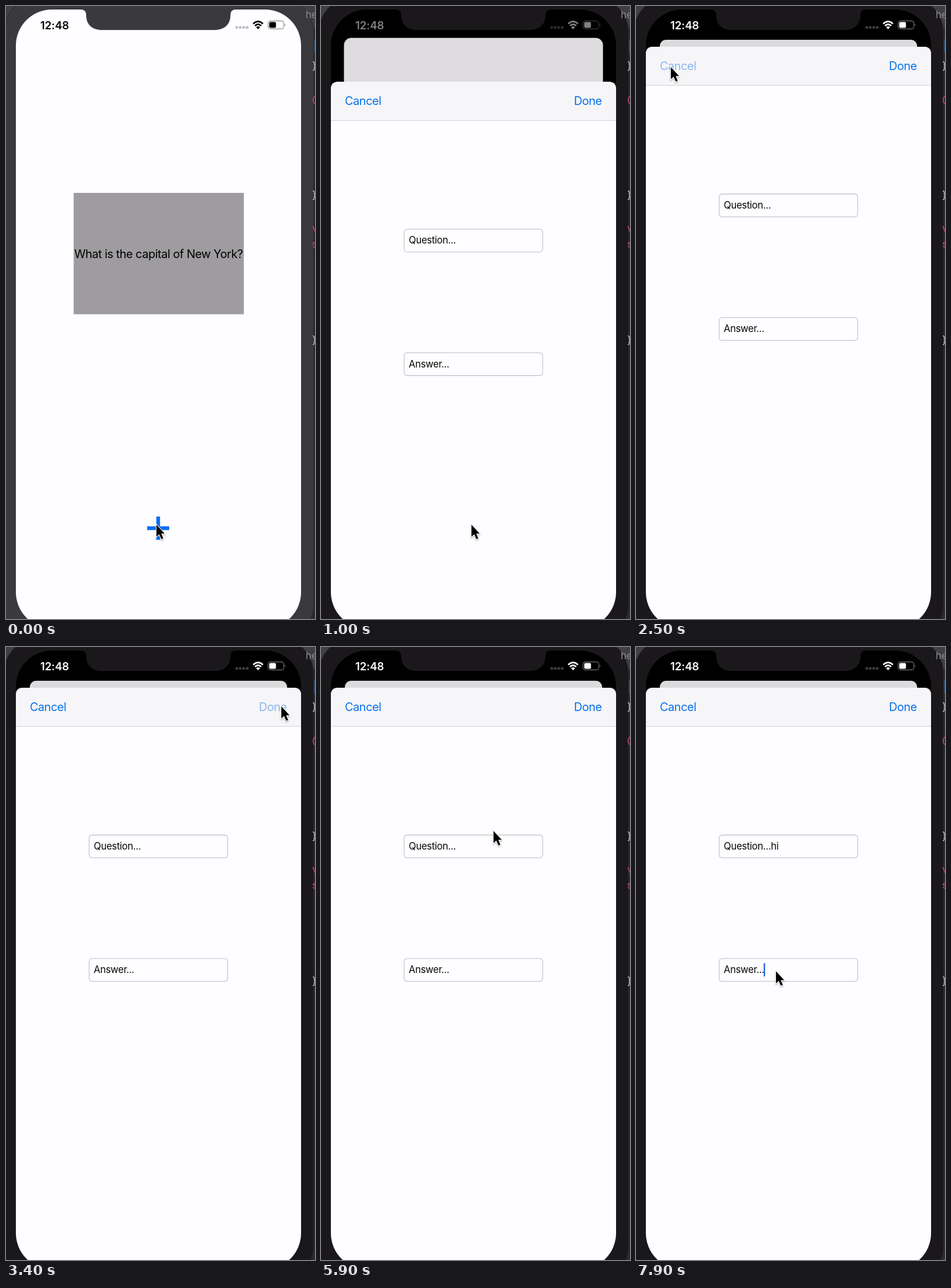
Animation, 532 px wide and 1053 px high, one loop 8 s. Source, as an HTML page:

```html
<!DOCTYPE html>
<html lang="en">
<head>
<meta charset="utf-8">
<title>Flash card sheet</title>
<style>
  html, body { margin: 0; width: 100%; height: 100%; overflow: hidden; background: #2b2a2e; }
  svg { display: block; width: 100vw; height: 100vh; }
  text { font-family: Inter, Roboto, sans-serif; white-space: pre; }
  .body { font-size: 20px; letter-spacing: -.5px; }
  .input { font-size: 16.6px; letter-spacing: -.3px; fill: #080808; }
  .time { font-size: 18.8px; font-weight: 600; letter-spacing: -.15px; }
  .link { fill: #0872ee; }
  .code { font: 18px "DejaVu Sans Mono", monospace; }
  .field { fill: #fefdff; stroke: #c8c7ce; stroke-width: 1.3; }
  .caret { fill: #2163dc; }
</style>
</head>
<body>
<svg viewBox="0 0 532 1053" preserveAspectRatio="none">
  <defs>
    <clipPath id="screen">
      <path d="M17 68A62 62 0 0 1 79 6H128Q138 6 138 15C138 32 148 41.3 166 41.3H358C376 41.3 386.5 32 386.5 15Q386.5 6 396 6H446A62 62 0 0 1 508 68V1007A62 62 0 0 1 446 1069H79A62 62 0 0 1 17 1007Z"/>
    </clipPath>
    <filter id="shadow" x="-50%" y="-50%" width="200%" height="200%">
      <feDropShadow dx="0" dy="1.5" stdDeviation="1.3" flood-opacity=".35"/>
    </filter>
  </defs>

  <!-- editor behind the phone -->
  <rect width="532" height="1053" fill="#2b2a2e"/>
  <rect width="532" height="38" fill="#403f43"/>
  <rect x="528" y="57" width="4" height="23" fill="#29496b"/>
  <rect id="bezel" x="-4" y="-15" width="533.5" height="1105" rx="60" stroke="#29282b"/>
  <text x="516" y="21" font-size="17" fill="#8c8b8f">he</text>
  <g id="code" class="code"></g>

  <g clip-path="url(#screen)">
    <rect id="backdrop" x="17" y="0" width="491" height="1053"/>
    <g id="home">
      <rect x="116.5" y="321" width="293" height="208.5" fill="#9e9c9f"/>
      <text class="body" x="117.5" y="433">What is the capital of New York?</text>
      <path d="M243 897H281M262 877V917" stroke="#0b6ff5" stroke-width="6.5"/>
    </g>
    <rect id="card"/>
    <g id="status">
      <text class="time" x="59" y="39.5">12:48</text>
      <g id="dots">
        <rect x="395" y="34.5" width="4.6" height="4.6" rx="1.5"/>
        <rect x="401" y="34.5" width="4.6" height="4.6" rx="1.5"/>
        <rect x="407" y="34.5" width="4.6" height="4.6" rx="1.5"/>
        <rect x="413" y="34.5" width="4.6" height="4.6" rx="1.5"/>
      </g>
      <path d="M434 40L430.6 36.4Q434 33.6 437.4 36.4Z"/>
      <path d="M425.6 30.6Q434 22.8 442.4 30.6M428.6 34Q434 29 439.4 34" fill="none" stroke="currentColor" stroke-width="2.7"/>
      <rect x="451.2" y="25.6" width="27" height="13.8" rx="4" fill="none" stroke="currentColor" stroke-opacity=".45" stroke-width="1.2"/>
      <rect x="453.2" y="27.6" width="11.6" height="9.8" rx="2.2"/>
      <path d="M479.8 30.3Q482 32.5 479.8 34.8Z" opacity=".5"/>
    </g>
    <g id="sheet">
      <rect x="17" width="491" height="1100" rx="12" fill="#fefdff"/>
      <path d="M17 66V12Q17 0 29 0H496Q508 0 508 12V66Z" fill="#f6f5f7"/>
      <rect x="17" y="65.8" width="491" height="1.1" fill="#d4d3d6"/>
      <text id="cancel" class="body link" x="41" y="40">Cancel</text>
      <text id="done" class="body link" x="435.5" y="40">Done</text>
      <rect class="field" x="143.2" y="253" width="238.4" height="39.2" rx="5"/>
      <rect class="field" x="143.2" y="465.2" width="238.4" height="39.2" rx="5"/>
      <text id="question" class="input" x="151" y="278"></text>
      <text id="answer" class="input" x="151" y="490.2">Answer...</text>
      <rect id="caret" class="caret" width="2.4" height="22.5"/>
    </g>
  </g>

  <g id="cursor">
    <path d="M0 1V21.8L4.8 17.5L8.4 25.8L11.8 24.4L8.3 16.2H14.2Z" fill="#000" stroke="#fff" stroke-width="2" paint-order="stroke" filter="url(#shadow)"/>
  </g>
</svg>
<script>
const LOOP = 8000, STEP = 100;
const TEXT_X = 151, SHEET_TOP = 70, STAGE_H = 1053;
const $ = id => document.getElementById(id);
const set = (id, attrs) => {
  for (const key in attrs) $(id).setAttribute(key, attrs[key]);
};
const mix = (a, b, p) => a + (b - a) * p;
const clamp = v => Math.min(1, Math.max(0, v));
const gray = v => `rgb(${v},${v},${v})`;
const during = (t, from, to) => t >= from && t < to;

// time, x, y of the pointer tip
const pointerPath = [
  [0, 259, 890], [1000, 259, 890], [1600, 175, 468], [1800, 174, 469],
  [2300, 60, 104], [2700, 60, 104], [3200, 474, 101], [3400, 474, 101],
  [3500, 511, 126], [4000, 310, 372], [4400, 182, 343], [4500, 171, 343],
  [4600, 172, 341], [5100, 172, 341], [5400, 205, 344], [5900, 297, 315],
  [6800, 297, 315], [7700, 241, 556], [LOOP, 241, 556]
];

const codeMarks = [
  ["}", 109, "#c9c8cb"], ["@", 166, "#c2487f"], ["}", 331, "#c9c8cb"],
  ["v", 388, "#c2487f"], ["s", 415, "#c2487f"], ["}", 580, "#c9c8cb"]
];
$("code").innerHTML = codeMarks
  .map(([mark, y, fill]) => `<text x="527" y="${y}" fill="${fill}">${mark}</text>`).join("");

function pointerAt(t) {
  const i = pointerPath.findIndex(k => k[0] > t);
  const [t0, x0, y0] = pointerPath[i - 1], [t1, x1, y1] = pointerPath[i];
  const p = (t - t0) / (t1 - t0), eased = p * p * (3 - 2 * p);
  return [mix(x0, x1, eased), mix(y0, y1, eased)];
}

// critically damped spring, 0 to 1
function spring(ms) {
  const wt = 18.26 * Math.max(0, ms) / 1000;
  return 1 - (1 + wt) * Math.exp(-wt);
}

function drawSheet(t) {
  const open = t >= 900;
  const p = spring(t - 753.9);
  const inset = mix(17, 41, p), top = mix(6, 58, p);
  const ink = open ? Math.round(mix(64, 255, clamp((t - 900) / 300))) : 0;

  set("bezel", { fill: open ? "#1a181b" : "#3a393b" });
  set("backdrop", { fill: open ? "#000" : "#fefdff" });
  set("status", { fill: gray(ink), color: gray(ink) });
  set("dots", { fill: open ? gray(Math.round(mix(30, 62, ink / 255))) : "#bdbcbe" });
  for (const id of ["card", "sheet"]) set(id, { visibility: open ? "visible" : "hidden" });
  set("home", { visibility: open ? "hidden" : "visible" });

  const shade = Math.round(mix(254, 220, p));
  set("card", {
    x: inset, y: top, width: 525 - 2 * inset, height: STAGE_H,
    rx: mix(40, 11, p), fill: `rgb(${shade},${shade - 2},${shade + 1})`
  });
  set("sheet", { transform: `translate(0 ${mix(STAGE_H, SHEET_TOP, p)})` });
}

function drawForm(t) {
  const typed = t < 6300 ? 0 : t < 6500 ? 1 : 2;
  $("question").textContent = "Question..." + "hi".slice(0, typed);
  const inAnswer = t >= 7900;
  const field = $(inAnswer ? "answer" : "question");
  set("caret", {
    x: TEXT_X + field.getComputedTextLength() - 1,
    y: inAnswer ? 473.3 : 261,
    opacity: t >= 6200 ? 1 : 0
  });
  set("cancel", { opacity: during(t, 2400, 2600) ? .45 : 1 });
  set("done", { opacity: during(t, 3300, 3500) ? .45 : 1 });
}

function draw(time) {
  const t = Math.floor(time % LOOP / STEP) * STEP;
  const [x, y] = pointerAt(t);
  drawSheet(t);
  drawForm(t);
  set("cursor", { transform: `translate(${x} ${y})` });
}

const start = performance.now();
function tick(now) {
  draw(Math.max(0, now - start));
  requestAnimationFrame(tick);
}
draw(0);
requestAnimationFrame(tick);
</script>
</body>
</html>
```
